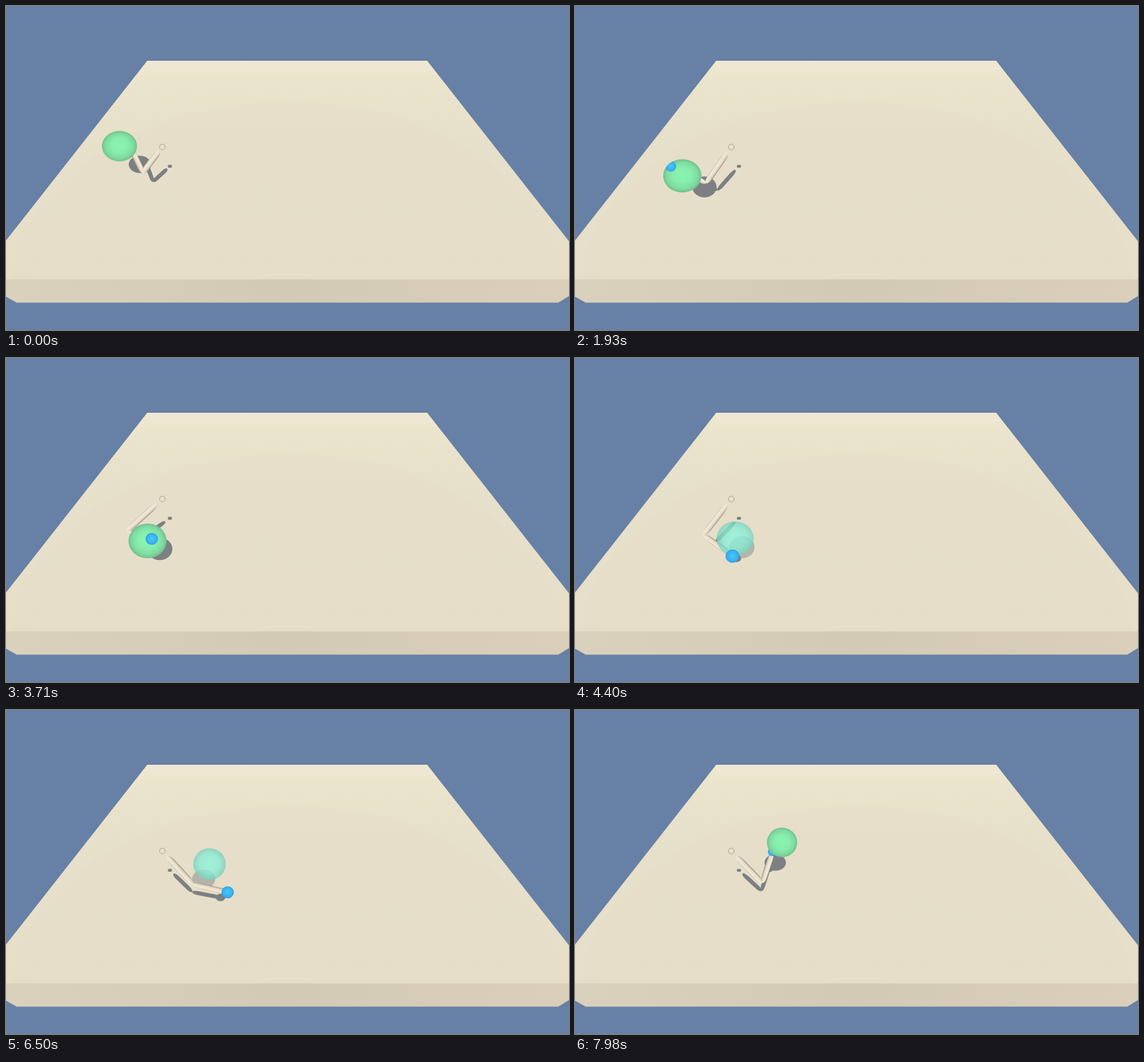
Animation, 893 px wide and 515 px high, one loop 8000 ms. Source, as an HTML page with a canvas:

```html
<!DOCTYPE html>
<html lang="en">
<head>
<meta charset="utf-8">
<title>Reaching arm</title>
<style>
  html, body { margin: 0; width: 100%; height: 100%; overflow: hidden; background: #6780a5; }
  canvas { display: block; width: 893px; height: 515px; }
</style>
</head>
<body>
<canvas id="stage" width="893" height="515"></canvas>
<script>
const ctx = document.getElementById('stage').getContext('2d');
const LOOP = 8000, STEP = 77.4;
const SHOULDER = [248, 224.3], SHOULDER_SHADOW = [260, 254.7];
const SHADE = '#7d7f82';

// Key poses: time, elbow x and y, hand x and y
const poses = [
  [0, 217, 265, 196, 222],
  [1930, 208, 281.5, 152, 255],
  [3020, 190, 271, 211, 264],
  [4400, 203.5, 281, 249.3, 314.5],
  [4850, 234, 287, 273, 329],
  [5500, 268.5, 274.5, 295.5, 298.3],
  [6500, 296.5, 277, 351.5, 289.7],
  [6900, 297, 276, 352, 278],
  [7980, 297, 275, 313, 225]
];

// Smooth curve through the poses
function poseAt(t) {
  const last = poses.length - 1;
  let i = 0;
  while (i < last - 1 && t >= poses[i + 1][0]) i++;
  const a = poses[i], b = poses[i + 1], span = b[0] - a[0];
  const u = Math.min(1, (t - a[0]) / span), u2 = u * u, u3 = u2 * u;
  const before = poses[Math.max(0, i - 1)], after = poses[Math.min(last, i + 2)];
  return a.slice(1).map((p, j) => {
    const c = j + 1, q = b[c];
    const m = (q - before[c]) / (b[0] - before[0]) * span;
    const n = (after[c] - p) / (after[0] - a[0]) * span;
    return (2 * u3 - 3 * u2 + 1) * p + (u3 - 2 * u2 + u) * m + (3 * u2 - 2 * u3) * q + (u3 - u2) * n;
  });
}

// Steady orbit around the shoulder, seen in perspective
function goalAt(t) {
  const angle = .49 * (t / 1000 - 3.7), s = Math.sin(angle), c = Math.cos(angle);
  const x = 249.4 + (79 + 5 * c) * s - 25.5 * c;
  const y = 234.7 + 51 * c + 5 * c * c;
  const near = (y - 210) * .05;
  return { x, y, rx: 24 + near + (327 - x) * .022, ry: 23.5 + near };
}

const mix = (a, b, u) => [a[0] + (b[0] - a[0]) * u, a[1] + (b[1] - a[1]) * u];
const drop = ([x, y], height) => [x + (291 - x) * .29 * height, y + (13.6 + (287 - y) * .24) * height];

function gradient(g, colors) {
  colors.forEach(([at, color]) => g.addColorStop(at, color));
  return g;
}

function polygon(fill, points) {
  ctx.fillStyle = fill;
  ctx.beginPath();
  points.forEach(p => ctx.lineTo(...p));
  ctx.fill();
}

function ellipse(fill, x, y, rx, ry) {
  ctx.fillStyle = fill;
  ctx.beginPath();
  ctx.ellipse(x, y, rx, ry, 0, 0, 7);
  ctx.fill();
}

function ball(x, y, rx, ry, colors) {
  ctx.save();
  ctx.translate(x, y);
  ctx.scale(rx, ry);
  ellipse(gradient(ctx.createRadialGradient(0, -.08, 0, 0, 0, 1), colors), 0, 0, 1, 1);
  ctx.restore();
}

// Capsule with long tapering ends
function limb(a, b, w, fill) {
  const dx = b[0] - a[0], dy = b[1] - a[1], len = Math.hypot(dx, dy);
  ctx.save();
  ctx.translate(...a);
  ctx.rotate(Math.atan2(dy, dx));
  ctx.fillStyle = fill || gradient(ctx.createLinearGradient(0, -w, 0, w),
    [[0, '#938c7c'], [.2, '#d3cab7'], [.45, '#ebe2cf'], [.8, '#f2ead7'], [1, '#c9c0ad']]);
  ctx.beginPath();
  ctx.moveTo(0, 0);
  for (const s of [-1, 1]) {
    const from = s < 0 ? 0 : len, v = s * w;
    const at = k => from - s * len * k;
    ctx.bezierCurveTo(from, v * .65, at(.1), v, at(.27), v);
    ctx.lineTo(at(.73), v);
    ctx.bezierCurveTo(at(.9), v, at(1), v * .65, at(1), 0);
  }
  ctx.fill();
  ctx.restore();
}

function drawTable() {
  ctx.fillStyle = '#6780a5';
  ctx.fillRect(0, 0, 893, 515);
  const top = gradient(ctx.createLinearGradient(0, 87, 0, 435),
    [[0, '#f0e8d2'], [.1, '#ebe4cd'], [.3, '#e7e0ca'], [1, '#e6dec9']]);
  polygon(top, [[224, 87], [668, 87], [893, 374], [893, 435], [0, 435], [0, 372.7]]);
  ctx.save();
  ctx.beginPath();
  ctx.rect(0, 87, 893, 347);
  ctx.clip();
  ellipse('rgba(222,216,194,.2)', 446, 450, 435, 298);
  ctx.restore();
  const front = gradient(ctx.createLinearGradient(0, 0, 893, 0),
    [[0, '#dad1bd'], [.5, '#d3cab5'], [1, '#d9cfbb']]);
  polygon(front, [[0, 434.5], [893, 434.5], [893, 461], [876, 471.5], [17, 471.5], [0, 462]]);
}

function drawShadows(goal, elbow, hand, touching) {
  const [gx, gy] = drop([goal.x, goal.y], 1), near = goal.y - 210;
  const joint = drop(elbow, .76), tip = drop(hand, .95 - (hand[1] - 222) * .0045);
  ctx.save();
  ctx.filter = 'blur(0.7px)';
  ctx.globalAlpha = touching ? 1 : .45;
  ellipse(SHADE, gx, gy, 17 + near * .038, 13 + near * .06);
  ctx.globalAlpha = 1;
  limb(mix(SHOULDER_SHADOW, joint, .16), joint, 3.2, SHADE);
  limb(joint, tip, 3.2, SHADE);
  ellipse(SHADE, ...tip, 7.5, 6);
  ellipse(SHADE, ...SHOULDER_SHADOW, 3.4, 2.5);
  ctx.restore();
}

function drawGoal({ x, y, rx, ry }, touching) {
  ball(x, y, rx, ry, touching
    ? [[0, '#88f4b0'], [.45, '#87efae'], [.8, '#7fdca1'], [1, '#72bf90']]
    : [[0, 'rgba(140,245,222,.78)'], [.6, 'rgba(136,238,214,.77)'], [1, 'rgba(122,208,188,.78)']]);
}

function drawHand([x, y]) {
  const r = 9.5 + (y - 290) * .04;
  ball(x, y, r * 1.04, r, [[0, '#54c8fb'], [.35, '#41bdf8'], [.75, '#38b1f3'], [1, '#309cdf']]);
}

// Only the part of the hand that breaks through the goal
function drawHandThrough({ x, y, rx, ry }, hand) {
  ctx.save();
  ctx.beginPath();
  ctx.ellipse(x, y, rx, ry, 0, 0, 7);
  ctx.clip();
  drawHand(hand);
  ctx.restore();
}

function draw(t) {
  const [ex, ey, hx, hy] = poseAt(t), elbow = [ex, ey], hand = [hx, hy];
  const goal = goalAt(t);
  const touching = Math.hypot((hx - goal.x) / goal.rx, (hy - goal.y) / goal.ry) < .98;
  const handInFront = hy > 240;
  drawTable();
  drawShadows(goal, elbow, hand, touching);
  limb(elbow, hand, 4.4);
  limb(mix(SHOULDER, elbow, .15), elbow, 4.7);
  ball(...SHOULDER, 5, 5, [[0, '#f0e8d5'], [.6, '#e7deca'], [.85, '#cbc3b0'], [1, '#a09886']]);
  if (!handInFront) drawHand(hand);
  drawGoal(goal, touching);
  if (handInFront) touching ? drawHandThrough(goal, hand) : drawHand(hand);
}

const start = performance.now();
function tick() {
  const t = (performance.now() - start) % LOOP;
  draw(Math.floor((t + 13) / STEP) * STEP);
  requestAnimationFrame(tick);
}
tick();
</script>
</body>
</html>
```
